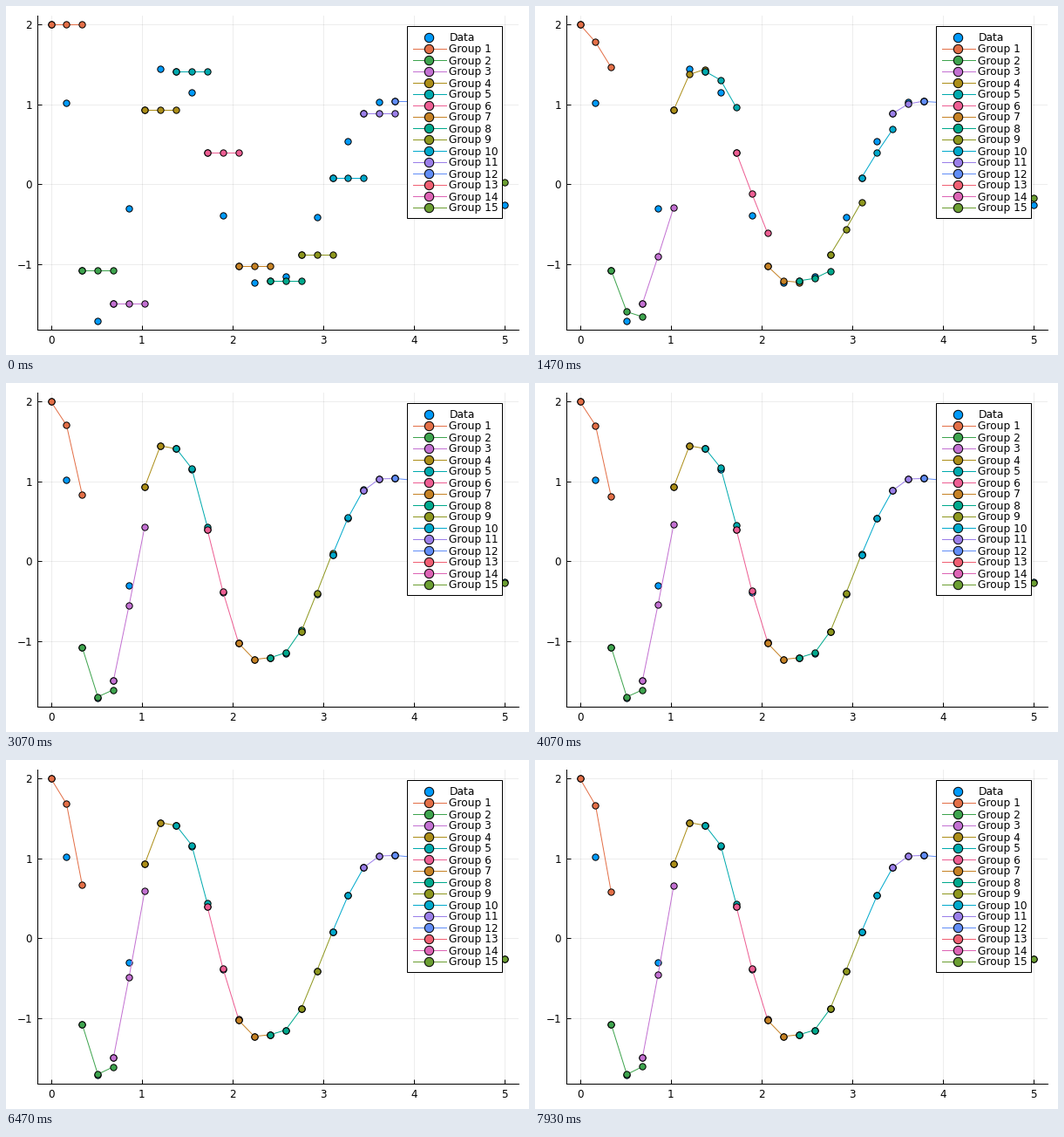
A matplotlib script for the animation above (8000 ms loop, 600 px wide and 400 px high).

```python
import numpy as np
import matplotlib.pyplot as plt
from matplotlib.animation import FuncAnimation
from matplotlib.patches import Rectangle

W, H, DPI = 600, 400, 100
FRAMES, LOOP = 120, 8000
PX = 72 / DPI  # points per pixel
N, GROUPS = 30, 15
END = 5.0
BLUE = "#009afa"
COLORS = ["#e36f47", "#3ea44e", "#c371d2", "#ac8e18", "#00aaae",
          "#ed5e93", "#c68225", "#00a98d", "#8e971e", "#00a9cc",
          "#9b7fe9", "#618df6", "#f05f73", "#dd64b5", "#6b9e32"]

plt.rcParams["font.family"] = "DejaVu Sans"
plt.rcParams["font.size"] = 12 * PX


def spiral(u):
    """Damped cubic oscillator; u holds both state components."""
    x, y = u ** 3
    return np.array([-0.1 * x - 2 * y, 2 * x - 0.1 * y])


def solve(field, u, steps, sub):
    """RK4 samples at every data interval, shape (steps + 1, ...)."""
    h = END / (N - 1) / sub
    out = [u]
    for _ in range(steps):
        for _ in range(sub):
            k1 = field(u)
            k2 = field(u + h / 2 * k1)
            k3 = field(u + h / 2 * k2)
            k4 = field(u + h * k3)
            u = u + h / 6 * (k1 + 2 * k2 + 2 * k3 + k4)
        out.append(u)
    return np.array(out)


t = np.linspace(0, END, N)
states = solve(spiral, np.array([2.0, 0.0]), N - 1, 100)
data = states[:, 0]
starts = states[::2].T


def learned(frame):
    """Field known so far: speed rings in to 1, strong forces saturate."""
    speed = 1 - np.cos(np.pi * frame / 72) * np.exp(-(frame / 28) ** 2)
    cap = 2.4 + 0.009 * frame
    drag = 0.25 * (1 - np.exp(-frame / 5))

    def field(u):
        force = u ** 3
        soft = force / (1 + (force / cap) ** 6) ** (1 / 6)
        x, y = soft
        return np.array([speed * (-0.1 * x - 2 * y) - drag * (force[0] - x),
                         speed * (2 * x - 0.1 * y)])

    return field


fig = plt.figure(figsize=(W / DPI, H / DPI), dpi=DPI, facecolor="white")

# Plot area
L, R, T, B = 35.9, 587.5, 11.0, 370.9
ax = fig.add_axes([L / W, 1 - B / H, (R - L) / W, (B - T) / H])
ax.set_xlim(-0.15, 5.15)
lo, hi = data.min(), data.max()
pad = 0.03 * (hi - lo)
ax.set_ylim(lo - pad, hi + pad)
ax.set_xticks(range(6))
ax.set_yticks(range(-1, 3))
ax.grid(color="black", alpha=0.1, lw=0.7 * PX)
ax.set_axisbelow(True)
ax.tick_params(direction="in", length=5 * PX, width=PX, pad=6 * PX)
ax.spines[["top", "right"]].set_visible(False)
ax.spines[["left", "bottom"]].set_linewidth(PX)

dot = dict(marker="o", mec="black", mew=PX)
ax.plot(t, data, ls="", mfc=BLUE, ms=7.3 * PX, **dot)
lines = [ax.plot([], [], color=c, lw=PX, ms=7.3 * PX, **dot)[0] for c in COLORS]

# Legend, laid out in pixels
top = fig.add_axes([0, 0, 1, 1])
top.set_xlim(0, W)
top.set_ylim(H, 0)
top.axis("off")
top.add_patch(Rectangle((460, 23), 109, 220, fc="white", ec="black", lw=PX))
for i, color in enumerate([BLUE] + COLORS):
    y = 36 + i * 13
    if i:
        top.plot([466.5, 504.5], [y, y], color=color, lw=PX)
    top.plot(485.4, y, mfc=color, ms=10.4 * PX, **dot)
    top.text(508.5, y + 4.5, f"Group {i}" if i else "Data",
             va="baseline", fontsize=12.3 * PX)


def draw(frame):
    paths = solve(learned(frame), starts, 2, 12)[:, 0]
    for g, line in enumerate(lines):
        xs = t[2 * g:2 * g + 3]
        line.set_data(xs, paths[:len(xs), g])
    return lines


anim = FuncAnimation(fig, draw, frames=FRAMES, interval=LOOP / FRAMES,
                     repeat=True, repeat_delay=0, blit=False)
plt.show()
```
